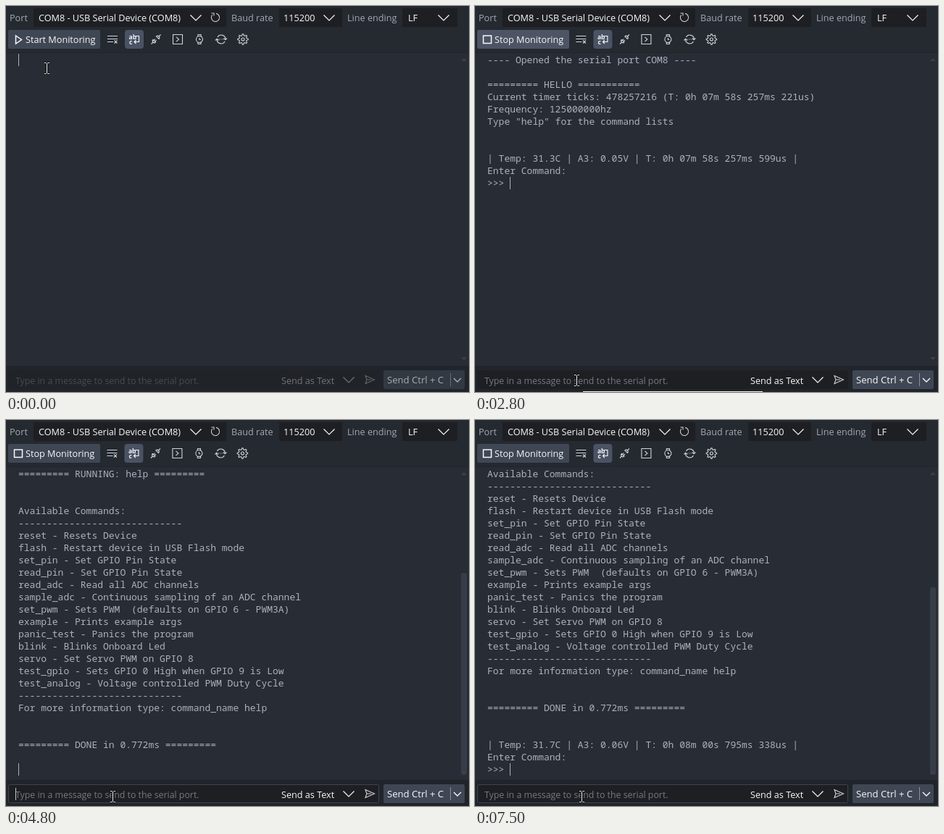
An HTML page with a canvas for the animation above (8000 ms loop, 639 by 533 pixels).

```html
<!DOCTYPE html>
<html>
<head>
<meta charset="utf-8">
<style>
html, body { margin: 0; width: 100%; height: 100%; overflow: hidden; background: #21252b; }
canvas { display: block; }
</style>
</head>
<body>
<canvas id="stage" width="639" height="533"></canvas>
<script>
const ctx = document.getElementById('stage').getContext('2d');
const LOOP = 8000;
const ui = size => `${size}px "Open Sans", "Noto Sans", sans-serif`;
const UI = ui(12.65);
const MONO = '500 13px "Noto Sans Mono", "DejaVu Sans Mono", monospace';
const WHITE = '#f7f8fa', GREY = '#a2a8b2', BUTTON = '#404754', ACTIVE = '#4d5565', FIELD = '#1d1f23';

const ICONS = {
  chevron: 'M.5 4.5L8 12L15.5 4.5',
  smallChevron: 'M3 6L8 11L13 6',
  refresh: 'M9 2.4A5.6 5.6 0 1 1 3.6 4.4M2.5 2H6V5.5',
  clear: 'M1 3.5H15M1 7.5H15M1 11.5H9M10.5 9.5L14.5 13.5M14.5 9.5L10.5 13.5',
  wrap: 'M10 3.5H14.5V11.5H8M10.5 9L8 11.5L10.5 14',
  plug: 'M1.5 14.5L4 12M4 8.5L7.5 12A2.5 2.5 0 0 1 4 12A2.5 2.5 0 0 1 4 8.5ZM8.5 4L12 7.5A2.5 2.5 0 0 0 12 4A2.5 2.5 0 0 0 8.5 4ZM12 4L14.5 1.5M5.2 9.5L7 7.7M6.7 11L8.5 9.2',
  console: 'M1.5 1.5H14.5V14.5H1.5ZM6 4.8L9.5 8L6 11.2',
  watch: 'M12.5 8A4.5 4.5 0 1 1 3.5 8A4.5 4.5 0 1 1 12.5 8M5.7 4L6 1.5H10L10.3 4M5.7 12L6 14.5H10L10.3 12M8 6V8.5H10',
  sync: 'M3 5A5.8 5.8 0 0 1 13.8 8.5M11.5 6.5L13.8 8.8L16 6.5M13 11A5.8 5.8 0 0 1 2.2 7.5M4.5 9.5L2.2 7.2L0 9.5M5 8H6M7.5 8H8.5M10 8H11',
  gear: gearPath(),
  send: 'M2 2.5L14.5 8L2 13.5L4 8ZM4 8H10'
};

const BOOT = [
  '---- Opened the serial port COM8 ----',
  '',
  '========= HELLO ===========',
  'Current timer ticks: 478257216 (T: 0h 07m 58s 257ms 221us)',
  'Frequency: 125000000hz',
  'Type "help" for the command lists',
  '', '',
  '| Temp: 31.3C | A3: 0.05V | T: 0h 07m 58s 257ms 599us |',
  'Enter Command:',
  '>>> '
];
const RULE = '-'.repeat(29);
const HELP = [
  '========= RUNNING: help =========',
  '', '',
  'Available Commands:',
  RULE,
  'reset - Resets Device',
  'flash - Restart device in USB Flash mode',
  'set_pin - Set GPIO Pin State',
  'read_pin - Set GPIO Pin State',
  'read_adc - Read all ADC channels',
  'sample_adc - Continuous sampling of an ADC channel',
  'set_pwm - Sets PWM  (defaults on GPIO 6 - PWM3A)',
  'example - Prints example args',
  'panic_test - Panics the program',
  'blink - Blinks Onboard Led',
  'servo - Set Servo PWM on GPIO 8',
  'test_gpio - Sets GPIO 0 High when GPIO 9 is Low',
  'test_analog - Voltage controlled PWM Duty Cycle',
  RULE,
  'For more information type: command_name help',
  '', '',
  '========= DONE in 0.772ms =========',
  '', '',
  '| Temp: 31.7C | A3: 0.06V | T: 0h 08m 00s 795ms 338us |',
  'Enter Command:',
  '>>> '
];

// time, x, y
const MOUSE = [
  [0, 56, 86], [300, 67, 49], [750, 67, 49], [1200, 205, 520], [1300, 205, 520],
  [1350, 180, 524], [1400, 135, 522], [1450, 140, 519], [1900, 140, 519], [1950, 140, 517],
  [3100, 140, 517], [3200, 144, 519], [3300, 144, 519], [3350, 147, 520], [LOOP, 147, 520]
];

function gearPath() {
  let d = '';
  for (let i = 0; i < 32; i++) {
    const a = (i - 0.5) * Math.PI / 16, r = i % 4 < 2 ? 7.2 : 5.2;
    d += `${i ? 'L' : 'M'}${8 + r * Math.cos(a)} ${8 + r * Math.sin(a)}`;
  }
  return d + 'ZM10 8A2 2 0 1 1 6 8A2 2 0 1 1 10 8';
}

function box(x, y, w, h, color, r = 0) {
  ctx.fillStyle = color;
  ctx.beginPath();
  ctx.roundRect(x, y, w, h, r);
  ctx.fill();
}

function frame(x, y, w, h, color, r = 0) {
  ctx.strokeStyle = color;
  ctx.lineWidth = 1;
  ctx.beginPath();
  ctx.roundRect(x + 0.5, y + 0.5, w - 1, h - 1, r);
  ctx.stroke();
}

function text(s, x, y, color, font = UI) {
  ctx.font = font;
  ctx.fillStyle = color;
  ctx.fillText(s, x, y);
}

function icon(name, cx, cy, color = '#d0d3d9', width = 1.1) {
  ctx.save();
  ctx.translate(cx - 8, cy - 8);
  ctx.strokeStyle = color;
  ctx.lineWidth = width;
  ctx.stroke(new Path2D(ICONS[name]));
  ctx.restore();
}

function faded(alpha, draw) {
  ctx.save();
  ctx.globalAlpha = alpha;
  draw();
  ctx.restore();
}

function mouseAt(t) {
  const i = MOUSE.findIndex(k => k[0] > t);
  const [t0, x0, y0] = MOUSE[i - 1], [t1, x1, y1] = MOUSE[i];
  let p = (t - t0) / (t1 - t0);
  p = p * p * (3 - 2 * p);
  return [x0 + (x1 - x0) * p, y0 + (y1 - y0) * p];
}

function drawToolbar(t, hover) {
  const open = t >= 650, focused = open && t < 3150;
  text('Port', 5, 21, GREY);
  text('Baud rate', 311, 21, GREY);
  text('Line ending', 471, 21, GREY);
  box(38, 3, 266, 26, FIELD, 2);
  box(377, 3, 87, 26, FIELD, 2);
  box(547, 3, 76, 26, FIELD, 2);
  text('COM8 - USB Serial Device (COM8)', 45, 21, WHITE);
  text('115200', 383, 21, WHITE);
  text('LF', 555, 21, WHITE);
  for (const x of [262, 446, 604]) icon('chevron', x, 16, WHITE, 1.2);
  icon('refresh', 289, 16);

  box(3, 33, 127, 26, hover || focused ? ACTIVE : BUTTON, 2);
  ctx.strokeStyle = WHITE;
  ctx.lineWidth = 1.5;
  ctx.stroke(new Path2D(open ? 'M11.5 41H22.5V51.5H11.5Z' : 'M13.5 41L21.5 46.5L13.5 52Z'));
  text(open ? 'Stop Monitoring' : 'Start Monitoring', 27, 51, WHITE);

  const x = open ? 146.4 : 147;
  box(x + 17, 33, 26, 26, '#4a5364', 4);
  ['clear', 'wrap', 'plug', 'console', 'watch', 'sync', 'gear']
    .forEach((name, i) => icon(name, x + 30 * i, 46, i === 1 ? WHITE : undefined));
  const tiny = 'bold 8.5px "Open Sans", sans-serif';
  text('ab', x + 22.5, 45.5, WHITE, tiny);
  text('c', x + 23, 53, WHITE, tiny);
}

function drawTerminal(t) {
  box(0, 64, 639, 433, '#282c34');
  box(0, 64, 639, 1, '#22252c');
  let lines = [''];
  if (t >= 5400) lines = HELP.slice(3);
  else if (t >= 4800) lines = HELP.slice(0, 25);
  else if (t >= 2800) lines = BOOT;
  else if (t >= 2300) lines = [...BOOT.slice(0, 3), ''];
  else if (t >= 800) lines = [BOOT[0], ''];
  lines.forEach((s, i) => text(s, 17, 79 + 17 * i, '#abb2bf', MONO));
  const last = lines.length - 1;
  box(17 + Math.round(lines[last].length * 7.8), 66 + 17 * last, 1, 17, '#abb2bf');

  if (t >= 4800) {
    const top = t >= 5400 ? 231 : 211;
    box(628, top, 8, 490 - top, '#373d48', 3);
  }
  ctx.fillStyle = '#3b414c';
  ctx.fill(new Path2D('M628 76L632 72L636 76ZM628 485L632 489L636 485Z'));
}

function drawInput(t) {
  const open = t >= 650, focused = t >= 3200;
  box(3, 503, 512, 26, open ? FIELD : '#202328', 2);
  if (focused) frame(3, 503, 512, 26, '#3e4452', 2);

  let typed = '';
  if (t >= 4000 && t < 4800) {
    typed = 'help'.slice(0, [4000, 4150, 4300, 4500].filter(k => t >= k).length);
  }
  if (typed) text(typed, 13, 522, WHITE);
  else text('Type in a message to send to the serial port.', 13, 522, open ? '#747982' : '#484c53', ui(12.35));

  const toggles = [3200, 3850, 4000, 5400, 5900, 6450, 6950, 7500];
  if (toggles.filter(k => t >= k).length % 2) {
    ctx.font = UI;
    box(13 + Math.round(ctx.measureText(typed).width), 508, 1, 17, '#c8ccd4');
  }

  faded(open ? 1 : 0.38, () => {
    text('Send as Text', 380, 522, WHITE);
    icon('chevron', 473, 516, WHITE, 1.2);
    icon('send', 502, 516);
  });
  faded(open ? 1 : 0.6, () => {
    box(521, 503, 112, 26, BUTTON, 2);
    text('Send Ctrl + C', 526, 521, WHITE, ui(13.1));
    box(613, 507, 1, 18, '#8b919c');
    icon('smallChevron', 623, 516, WHITE, 1.4);
  });
  if (t >= 2250 && t < 3200) box(149, 532, 248, 1, '#f2f2f2');
}

function drawMouse([x, y], hand) {
  ctx.save();
  ctx.translate(Math.round(x), Math.round(y));
  if (hand) {
    const shape = new Path2D('M-1.5 1Q0 -1 1.5 1V6L7 7Q9.5 7.5 9.5 10V14L7.5 19H-1.5L-6.5 12Q-6 9.5 -4 10.5L-1.5 13Z');
    ctx.fillStyle = '#fff';
    ctx.fill(shape);
    ctx.strokeStyle = '#000';
    ctx.lineWidth = 1;
    ctx.stroke(shape);
  } else {
    const beam = new Path2D('M-3 -7.5H-.5M1.5 -7.5H4M.5 -7V7M-3 7.5H-.5M1.5 7.5H4');
    for (const [color, width] of [['#000', 2.4], ['#fff', 1]]) {
      ctx.strokeStyle = color;
      ctx.lineWidth = width;
      ctx.stroke(beam);
    }
  }
  ctx.restore();
}

function draw(t) {
  const mouse = mouseAt(t);
  const hover = mouse[1] < 59;
  box(0, 0, 639, 533, '#21252b');
  box(0, 0, 639, 64, '#252930');
  faded(t >= 600 && t < 650 ? 0.6 : 1, () => drawToolbar(t, hover));
  drawTerminal(t);
  drawInput(t);
  drawMouse(mouse, hover);
}

const start = performance.now();
function tick() {
  const t = (performance.now() - start) % LOOP;
  draw(Math.floor(t / 50) * 50);
  requestAnimationFrame(tick);
}
tick();
</script>
</body>
</html>
```
